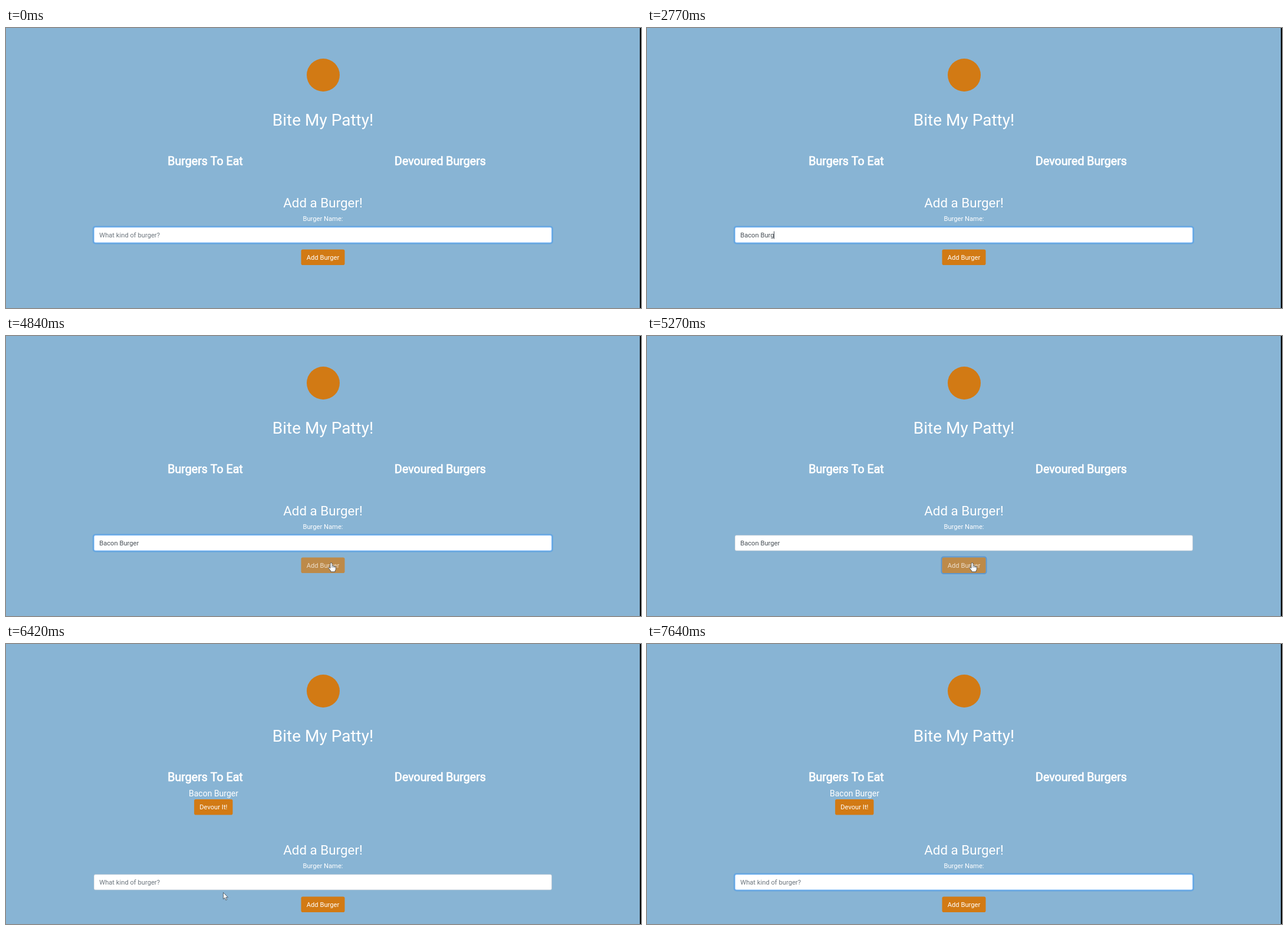
Write an HTML page with a canvas that moves like this. It is 1077x476 px and loops after 8000 ms.

```html
<!DOCTYPE html>
<html lang="en">
<head>
<meta charset="utf-8">
<title>Burger list</title>
<style>
  html, body { margin: 0; width: 100%; height: 100%; overflow: hidden; background: #88b4d4; }
  canvas { display: block; width: 1077px; height: 476px; }
</style>
</head>
<body>
<canvas id="stage" width="1077" height="476"></canvas>
<script>
const ctx = document.getElementById('stage').getContext('2d');
const LOOP = 8000;
const BG = '#88b4d4', ORANGE = '#d27a14', WHITE = '#fff';
const MID = 537.5;
const NAME = 'Bacon Burger';

// Time at which each letter of the name is typed
const KEYS = [270, 440, 610, 780, 1130, 1760, 2060, 2370, 2570, 2770, 3100, 3280];
const SENT = 5400;

// [start, end] spans in which the text caret shows
const CARET = [[100, 1610], [1760, 3590], [4320, 4470], [7160, 7640]];

// Pointer poses: start, end, shape, tip x, tip y
const POINTER = [
  [4470, 4650, 'hand', 545, 394],
  [4650, 4840, 'hand', 549, 390],
  [4840, 5810, 'hand', 551.5, 385.5],
  [5810, 6000, 'arrow', 455, 431],
  [6000, 6880, 'arrow', 368.5, 422.5]
];

const within = (t, a, b) => t >= a && t < b;

function text(str, x, y, size, color = WHITE, align = 'center') {
  ctx.font = `400 ${size}px Roboto, sans-serif`;
  ctx.textAlign = align;
  ctx.fillStyle = color;
  ctx.fillText(str, x, y);
}

function heading(str, x, y) {
  text(str, x, y, 19.6);
  ctx.strokeStyle = WHITE;
  ctx.lineWidth = 0.75;
  ctx.lineJoin = 'round';
  ctx.strokeText(str, x, y);
}

function box(x, y, w, h, r, color) {
  ctx.fillStyle = color;
  ctx.beginPath();
  ctx.roundRect(x, y, w, h, r);
  ctx.fill();
}

function button(label, cx, y, w, hover, focus) {
  const x = cx - w / 2, h = 26.6;
  if (focus) box(x - 2, y - 2, w + 4, h + 4, 4.5, 'rgba(50,125,205,.5)');
  if (hover) box(x, y, w, h, 2.8, BG);
  ctx.globalAlpha = hover ? 0.72 : 1;
  box(x, y, w, h, 2.8, ORANGE);
  text(label, cx, y + 17.2, 11.2);
  ctx.globalAlpha = 1;
}

function input(y, typed, focus, caret) {
  const x = 149, w = 776.8, h = 26.6;
  ctx.globalAlpha = focus;
  box(x - 2.2, y - 2.2, w + 4.4, h + 4.4, 5, '#66a6df');
  ctx.globalAlpha = 1;
  box(x, y, w, h, 2.8, focus > 0.5 ? '#80bdff' : '#ced4da');
  box(x + 0.7, y + 0.7, w - 1.4, h - 1.4, 2.2, WHITE);
  const tx = 158.2, base = y + 17.3;
  text(typed || 'What kind of burger?', tx, base, 11.2, typed ? '#495057' : '#6c757d', 'left');
  if (caret) {
    const end = typed ? tx + ctx.measureText(typed).width : tx;
    ctx.fillStyle = '#495057';
    ctx.fillRect(Math.floor(end), y + 7, 1, 13);
  }
}

const SHAPES = {
  hand: new Path2D('M0 0Q1.6 0 1.6 1.6V5Q3.3 4.4 4 5.7Q5.5 5.2 6 6.6Q7.8 6.4 7.8 8.3' +
    'V10.8Q7.8 12.5 6.5 13.6V15.3H-.7V13.8L-4.3 9.3Q-4.8 7.7-3 7.9L-1.5 9.3V1.6Q-1.5 0 0 0Z'),
  arrow: new Path2D('M0 0V11.2L2.6 8.8L4.4 13L6.2 12.2L4.5 8.2H8Z')
};

function pointer(shape, x, y) {
  ctx.save();
  ctx.translate(x, y);
  ctx.fillStyle = WHITE;
  ctx.fill(SHAPES[shape]);
  ctx.strokeStyle = '#39444f';
  ctx.lineWidth = 0.8;
  ctx.stroke(SHAPES[shape]);
  if (shape === 'hand') {
    ctx.beginPath();
    for (const fx of [1.6, 4, 6]) {
      ctx.moveTo(fx, 5.6);
      ctx.lineTo(fx, 8.2);
    }
    ctx.stroke();
  }
  ctx.restore();
}

function clickRing(x, y) {
  ctx.strokeStyle = 'rgba(220,20,60,.6)';
  ctx.lineWidth = 3;
  ctx.beginPath();
  ctx.arc(x, y, 22.5, 0, Math.PI * 2);
  ctx.stroke();
}

function focusLevel(t) {
  if (t < 5120 || t >= 7490) return 1;
  return t < 5270 ? 0.5 : 0;
}

function draw(t) {
  ctx.fillStyle = BG;
  ctx.fillRect(0, 0, 1077, 476);

  ctx.fillStyle = ORANGE;
  ctx.beginPath();
  ctx.arc(538, 80, 28, 0, Math.PI * 2);
  ctx.fill();

  text('Bite My Patty!', MID, 166.3, 28);
  heading('Burgers To Eat', 338, 233);
  heading('Devoured Burgers', 736.5, 233);

  const sent = t >= SENT;
  if (sent) {
    text(NAME, 352, 258.6, 14);
    button('Devour It!', 351.8, 263.9, 65.4);
  }

  const dy = sent ? 53 : 0;
  text('Add a Burger!', MID, 305 + dy, 22.4);
  text('Burger Name:', MID, 328.4 + dy, 11.2);

  const typed = sent ? '' : NAME.slice(0, KEYS.filter(k => t >= k).length);
  input(338.6 + dy, typed, focusLevel(t), CARET.some(([a, b]) => within(t, a, b)));
  button('Add Burger', MID, 376.4 + dy, 74, within(t, 4470, SENT), within(t, 5120, SENT));

  if (within(t, 5120, 5270)) clickRing(551.5, 390);
  if (within(t, 7160, 7490)) clickRing(352, 404.2);

  const pose = POINTER.find(([a, b]) => within(t, a, b));
  if (pose) {
    ctx.globalAlpha = within(t, 6760, 6880) ? 0.4 : 1;
    pointer(...pose.slice(2));
    ctx.globalAlpha = 1;
  }

  ctx.fillStyle = '#000';
  ctx.fillRect(1075, 0, 2, 476);
}

const start = performance.now();
function tick() {
  draw((performance.now() - start) % LOOP);
  requestAnimationFrame(tick);
}
tick();
</script>
</body>
</html>
```
